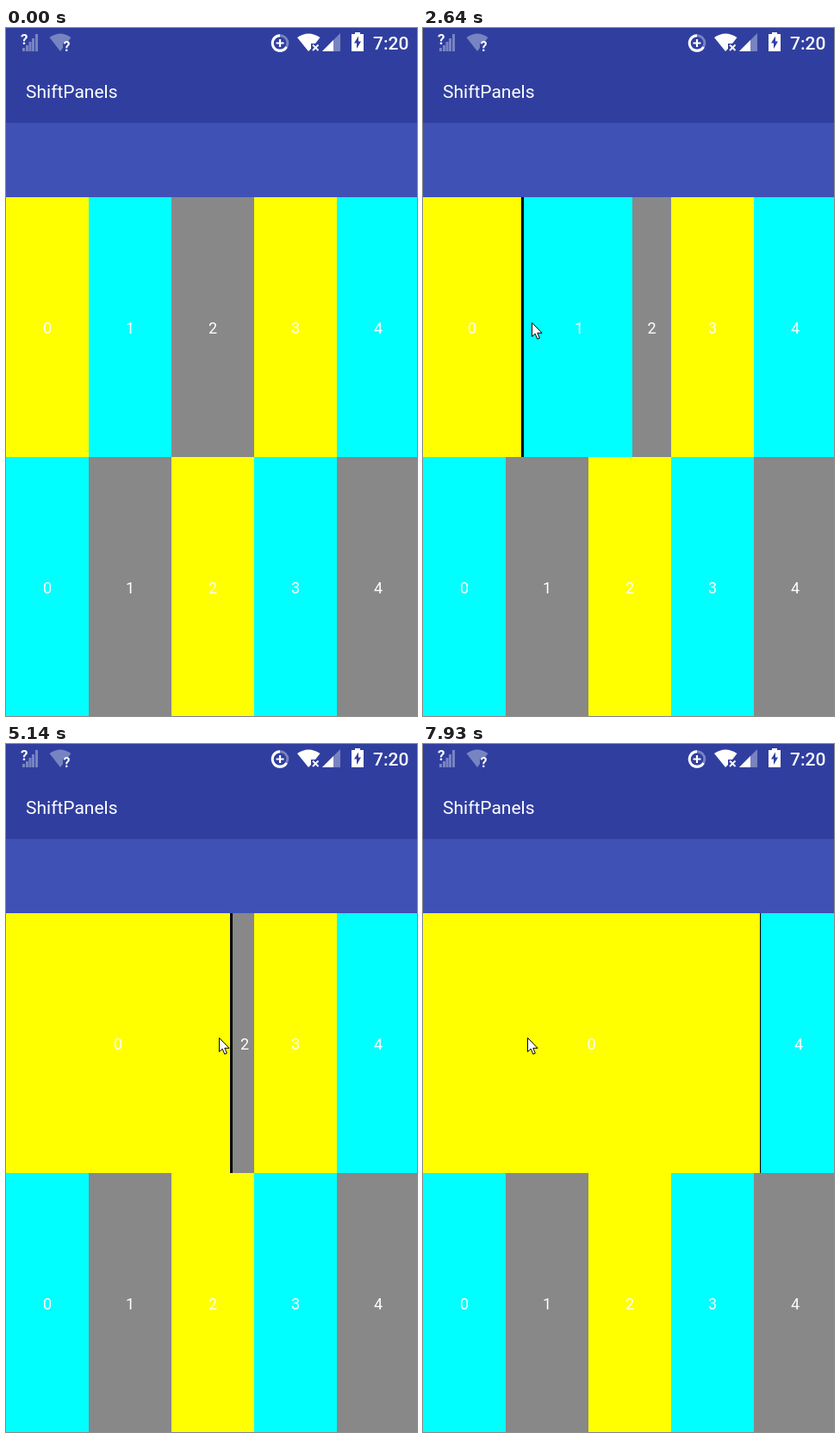
Animation, 477 px wide and 797 px high, one loop 8 s. Source, as an HTML page:

```html
<!DOCTYPE html>
<html lang="en">
<head>
<meta charset="utf-8">
<title>ShiftPanels</title>
<style>
  html, body { margin: 0; width: 100%; height: 100%; overflow: hidden; background: #3f51b5; }
  svg text { font-family: Roboto, sans-serif; fill: #fff; }
  #stage { display: block; width: 100%; height: 100%; }
  .label { font-size: 18px; text-anchor: middle; }
</style>
</head>
<body>
<svg id="stage" viewBox="0 0 477 797" xmlns="http://www.w3.org/2000/svg">
  <rect width="477" height="797" fill="#3f51b5"/>
  <rect width="477" height="110" fill="#303f9f"/>

  <g fill="#7883c1">
    <path d="M19 23h3v4h-3zM23 20h3v7h-3zM26.500 16h3v11h-3zM30 12h3v15h-3zM34 7h3v20h-3z"/>
    <path d="M50.500 11Q63 2 75.500 11L72 15.500Q66 14 66 20V23L63 27Z"/>
  </g>
  <g font-size="17" font-weight="700">
    <text x="17" y="19">?</text>
    <text x="66.500" y="27" font-size="16">?</text>
  </g>

  <g fill="none" stroke-width="3">
    <circle cx="318" cy="17.500" r="8.800" stroke="#7883c1"/>
    <path d="M318 8.700A8.800 8.800 0 1 0 325.600 21.900" stroke="#fff"/>
    <path d="M318 13v9M313.500 17.500h9" stroke="#fff" stroke-width="2.200"/>
  </g>
  <path d="M338 11Q351 2 364.500 11L359 18H354V24L351 27Z" fill="#fff"/>
  <path d="M356 19.500l6.500 6.500M362.500 19.500l-6.500 6.500" stroke="#fff" stroke-width="1.900"/>
  <path d="M367 27L388 6V27Z" fill="#7883c1"/>
  <path d="M367 27L380 14V27Z" fill="#fff"/>
  <path d="M401 7h4V5h6v2h4v20h-14z" fill="#fff"/>
  <path d="M409 9.500l-5 8h3v6.500l5-8.500h-3z" fill="#303f9f"/>
  <text x="426" y="25" font-size="21" font-weight="500">7:20</text>
  <text x="23" y="81" font-size="21">ShiftPanels</text>

  <rect y="196" width="480" height="301"/>
  <g id="blocks"></g>
  <path id="cursor" d="M.5 .5V16.500L4.200 13.200L6.800 19.300L9.300 18.200L6.800 12.300H12Z"
        fill="#fff" stroke="#000" stroke-linejoin="round"/>
</svg>
<script>
const LOOP = 8000, CELL = 96, COUNT = 5;
const YELLOW = '#ffff00', CYAN = '#00ffff', GRAY = '#888888';
const NS = 'http://www.w3.org/2000/svg';
const blocks = document.getElementById('blocks');
const cursor = document.getElementById('cursor');

const linear = p => p;
const smooth = p => p * p * (3 - 2 * p);
const easeOut = p => 1 - (1 - p) ** 2;
const cubicOut = p => 1 - (1 - p) ** 3;

// Cursor moves:  start, end, steps, ease, [x, y], upward/downward bow
// Block drags add: [left edge, gap end, label start], dragged block, lag
const move = (start, end, steps, ease, to, bow = 0) => ({ start, end, steps, ease, to, bow });
const drag = (start, end, steps, ease, xy, edge, block = 0, lag = 0) =>
  ({ start, end, steps, ease, to: [...xy, ...edge], block, lag });

const timeline = [
  move(130, 130, 1, linear, [354, 717]),
  move(210, 520, 5, easeOut, [169, 348]),
  drag(910, 1380, 7, smooth, [224, 348], [242, 243, 243], 1, 3),
  move(1530, 1930, 6, smooth, [113, 344], 10),
  move(2010, 2170, 3, easeOut, [108, 341]),
  drag(2410, 3030, 9, smooth, [178, 341], [166, 167, 167], 0, 3),
  move(3430, 3730, 5, smooth, [147, 341]),
  drag(4220, 4220, 1, linear, [174, 341], [183, 200, 215]),
  drag(4290, 4740, 7, easeOut, [232, 341], [246, 247, 247]),
  drag(5060, 5140, 2, linear, [247, 340], [260, 263, 266]),
  drag(5210, 5690, 7, easeOut, [272, 341], [288, 289, 289]),
  move(6150, 6700, 8, smooth, [21, 334], 22),
  drag(6850, 7000, 3, linear, [61, 333], [327, 331, 334]),
  drag(7080, 7540, 7, easeOut, [106, 338], [375, 376, 376]),
  drag(7780, 7930, 3, linear, [121, 340], [391, 392, 392])
];

function add(parent, tag, attrs) {
  const el = parent.appendChild(document.createElementNS(NS, tag));
  for (const key in attrs) el.setAttribute(key, attrs[key]);
  return el;
}

function makeBlock(i, y, height, fill) {
  const box = add(blocks, 'svg', { x: i * CELL, y, width: CELL, height, overflow: 'hidden' });
  add(box, 'rect', { width: 480, height, fill });
  const label = add(box, 'text', { class: 'label', x: CELL / 2, y: 158 });
  label.textContent = i;
  return { box, label };
}

const top5 = [YELLOW, CYAN, GRAY, YELLOW, CYAN].map((c, i) => makeBlock(i, 196, 301, c));
[CYAN, GRAY, YELLOW, CYAN, GRAY].forEach((c, i) => makeBlock(i, 497, 300, c));

function place({ box, label }, left, right, labelStart) {
  box.setAttribute('x', left);
  box.setAttribute('width', Math.max(0, right - left));
  label.setAttribute('x', (labelStart + right) / 2 - left);
  label.setAttribute('visibility', labelStart < right ? 'visible' : 'hidden');
}

function stateAt(t) {
  const lefts = Array.from({ length: COUNT }, (_, i) => i * CELL);
  let pos = [0, 0, CELL, CELL, CELL];
  let block = 0;
  for (const s of timeline) {
    if (t < s.start) break;
    if (s.block !== undefined && s.block !== block) {
      lefts[block + 1] = pos[3];
      block = s.block;
      pos.fill(lefts[block + 1], 2);
    }
    const gap = (s.end - s.start) / Math.max(1, s.steps - 1) || 1;
    const step = Math.min(s.steps, Math.floor((t - s.start) / gap + 1e-6) + 1);
    const p = s.ease(step / s.steps);
    const arc = p < 1 ? Math.sin(Math.PI * p) : 0;
    pos = pos.map((v, i) => i < s.to.length ? v + (s.to[i] - v) * p : v);
    pos[1] += (s.bow || 0) * arc;
    pos[3] += (s.lag || 0) * arc;
    pos[4] += 2 * (s.lag || 0) * arc;
  }
  return { lefts, block, pos: pos.map(Math.round) };
}

function render(t) {
  const { lefts, block, pos: [x, y, edge, gapEnd, labelStart] } = stateAt(t);
  top5.forEach((b, i) => {
    const left = lefts[i], right = i < COUNT - 1 ? lefts[i + 1] : COUNT * CELL;
    if (i < block) place(b, left, right, left);
    else if (i === block) place(b, left, edge, left);
    else place(b, Math.max(left, gapEnd), right, Math.max(left, labelStart));
  });
  cursor.setAttribute('transform', `translate(${x} ${y})`);
  cursor.setAttribute('visibility', t < timeline[0].start ? 'hidden' : 'visible');
}

const began = performance.now();
function tick() {
  render((performance.now() - began) % LOOP);
  requestAnimationFrame(tick);
}
tick();
</script>
</body>
</html>
```
